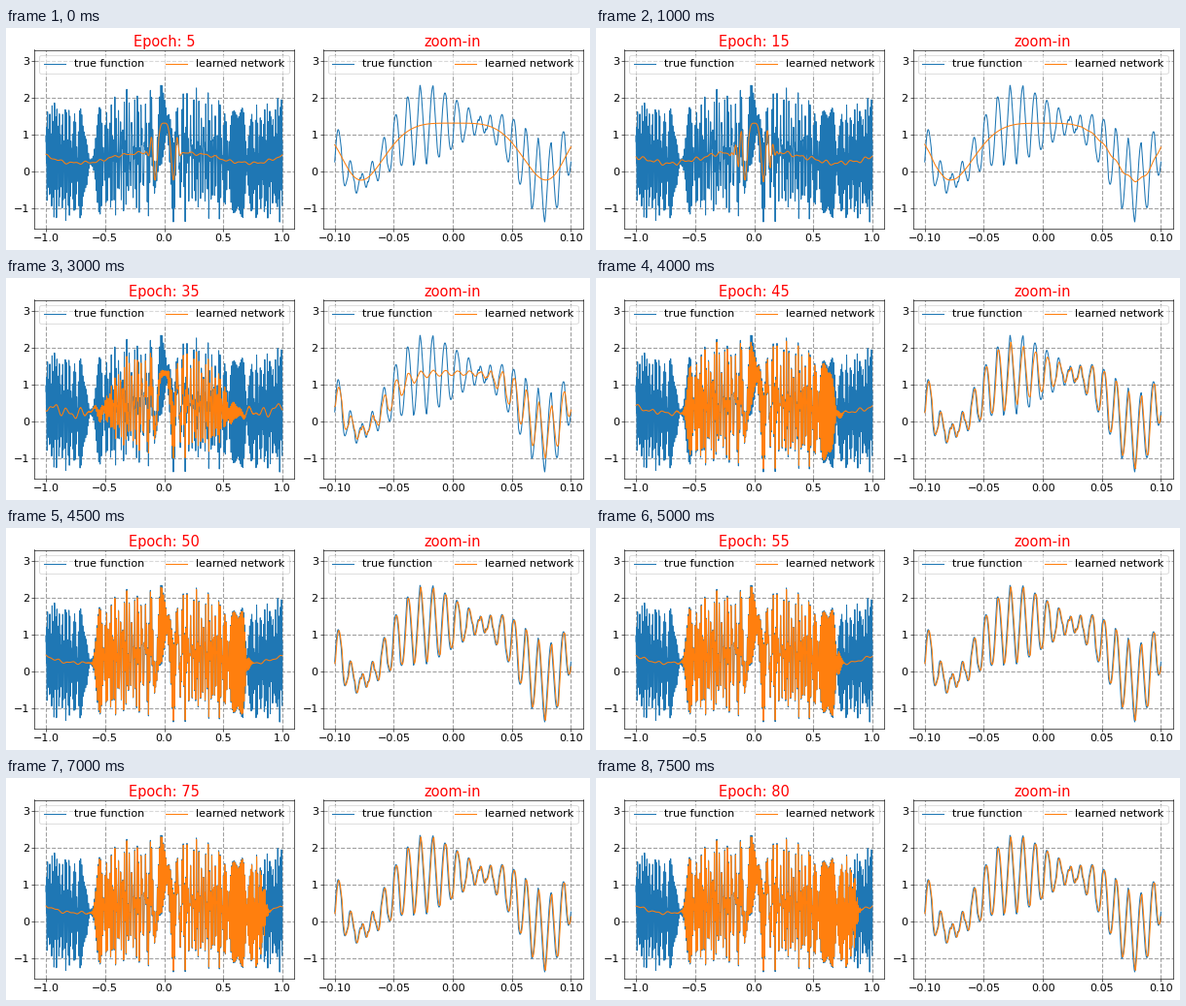
Animation, 600 px wide and 229 px high, one loop 8000 ms. Source, as a matplotlib script:

```python
import numpy as np
import matplotlib.pyplot as plt
from matplotlib.animation import FuncAnimation

W, H, DPI = 600, 229, 100
FRAMES, INTERVAL = 16, 500
PI = np.pi
THIN = 0.45

plt.rcParams.update({"font.family": "DejaVu Sans", "font.size": 8,
                     "axes.linewidth": THIN, "patch.linewidth": 0.8})


def envelope(x):
    return (1 + 8 * x**8) / (1 + 10 * x**4)


def chirp(x):
    return 0.8 * np.cos(160 * PI * x**2)


def carrier(x):
    tri = np.abs(180 * x - 2 * np.floor((180 * x + 1) / 2))
    return 0.6 * np.sin(200 * PI * x) + envelope(x) * (tri - 0.5)


def true_fn(x):
    return envelope(x) / 2 + chirp(x) + carrier(x)


def ramp(v, start, end):
    t = np.clip((v - start) / (end - start), 0, 1)
    return t * t * (3 - 2 * t)


def sigmoid(z):
    return 1 / (1 + np.exp(-np.clip(z, -50, 50)))


def learned(x, epoch):
    """Fit that spreads outwards from zero: chirp first, carrier later."""
    skill = ramp(epoch, 10, 50)
    unsettled = skill * (1 - skill)

    left = 0.11 + 0.49 * skill
    right = 0.11 + 0.59 * skill + 0.16 * ramp(epoch, 50, 80)
    soft = 0.012 + 0.2 * unsettled
    window = sigmoid((x + left) / soft) * sigmoid((right - x) / soft)

    # The carrier is picked up last around the middle.
    center, width = -0.03 * (1 - skill), 0.07 - 0.045 * skill
    hole = (1 - ramp(epoch, 30, 52)) * np.exp(-((x - center) / width)**4)
    carrier_gain = 0.96 * skill * window * (1 - hole)

    ripple = (np.sin(57 * x + 0.3 * epoch) + 0.7 * np.sin(97 * x - 0.5 * epoch)
              + 0.4 * np.sin(23 * x + epoch))
    ripple *= (0.025 + 0.3 * unsettled) * (1 - window)

    xs = x - 0.0006
    return (envelope(xs) / 2 + window * chirp(xs)
            + carrier_gain * carrier(xs) + ripple)


fig = plt.figure(figsize=(W / DPI, H / DPI), dpi=DPI, facecolor="white")


def panel(left, span, digits, count, heading):
    ax = fig.add_axes([left / W, (H - 206.8) / H, 267 / W, 184.3 / H])
    x = np.linspace(-span, span, count)
    ax.plot(x, true_fn(x), color="C0", lw=0.75, label="true function")
    line, = ax.plot(x, learned(x, 5), color="C1", lw=0.75,
                    label="learned network")
    ax.set_xlim(-1.1 * span, 1.1 * span)
    ax.set_ylim(-1.56, 3.29)
    ticks = np.linspace(-span, span, 5)
    ax.set_xticks(ticks, [f"{t:.{digits}f}".replace("-", "\u2212")
                          for t in ticks])
    ax.set_yticks(range(-1, 4))
    ax.tick_params(length=2, width=THIN, pad=1.5)
    ax.grid(ls="--", lw=0.8, color="#a0a0a0")
    ax.set_axisbelow(True)
    ax.legend(loc="upper center", ncol=2, framealpha=0.6)
    title = ax.set_title(heading, color="red", fontsize=10.5, pad=2.5)
    return x, line, title


x1, line1, title = panel(29, 1, 1, 10001, "Epoch: 5")
x2, line2, _ = panel(325.6, 0.1, 2, 2001, "zoom-in")


def update(frame):
    epoch = 5 * (frame + 1)
    title.set_text(f"Epoch: {epoch}")
    line1.set_ydata(learned(x1, epoch))
    line2.set_ydata(learned(x2, epoch))
    return line1, line2, title


anim = FuncAnimation(fig, update, frames=FRAMES, interval=INTERVAL,
                     repeat=True, repeat_delay=0, blit=False)
plt.show()
```
